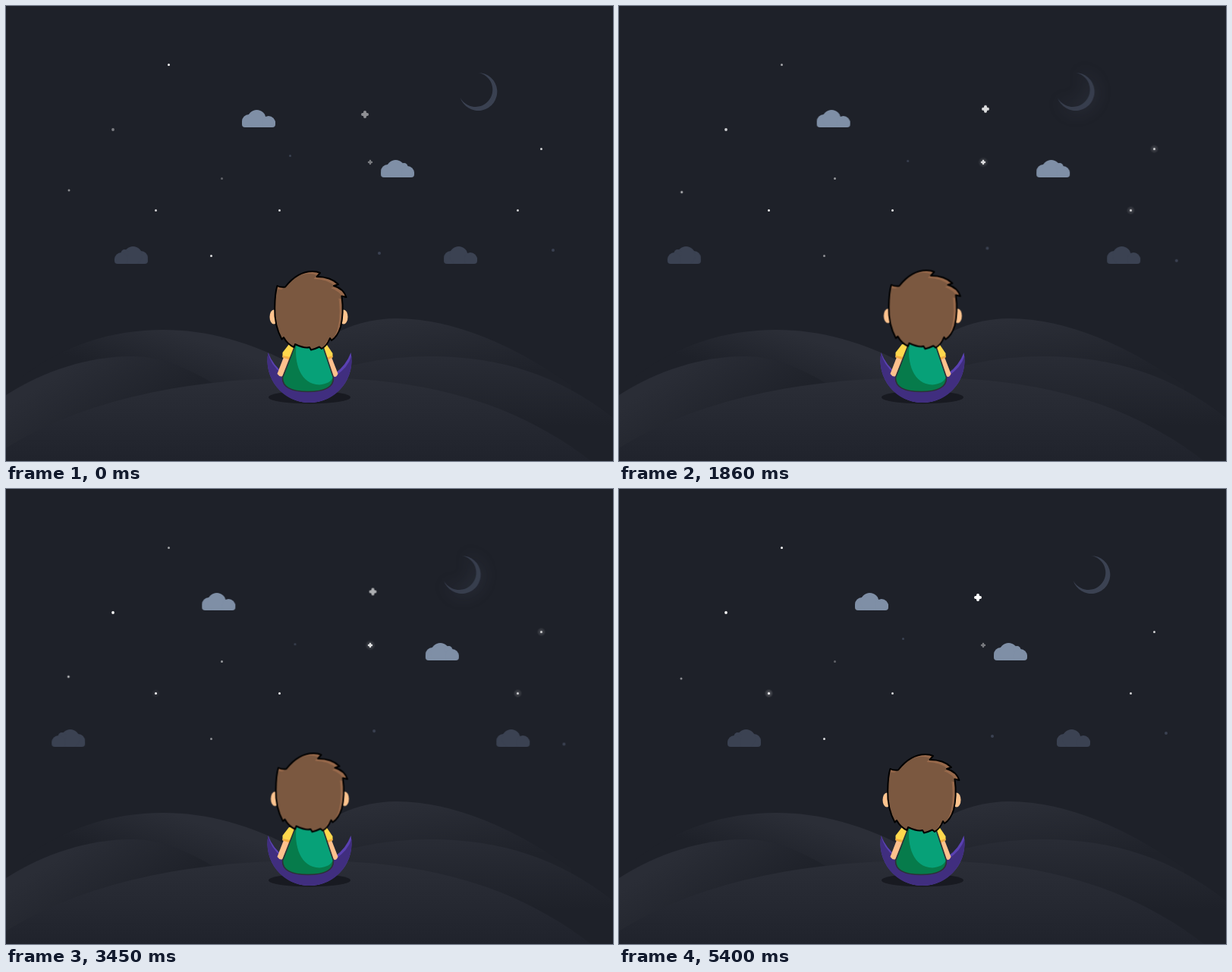
An HTML page for the animation above (5430 ms loop, 800 px wide and 600 px high).

```html
<!DOCTYPE html>
<html lang="en">
<head>
<meta charset="utf-8">
<title>Night sky</title>
<style>
html, body { margin: 0; width: 100%; height: 100%; overflow: hidden; background: #1e2129; }
svg { display: block; width: 800px; height: 600px; }

/* Half the cycle is 2700 ms out, 2700 ms back, then a short hold. */
.drift, .pulse, .rise, .repeat, .late, .slide { animation: 5430ms linear infinite; }
.drift { animation-name: drift; }
.slide { animation-name: slide; }
.pulse { animation-name: pulse; }
.rise { animation-name: rise; }
.repeat { animation-name: repeat; }
.late { animation-name: late; }

@keyframes drift {
  0%, 99.45%, 100% { transform: translate(0, 0); }
  49.72% { transform: translate(var(--x), var(--y, 0px)); }
}
@keyframes slide {
  0% { transform: translate(0, 0); }
  99.45%, 100% { transform: translate(var(--x), var(--y)); }
}
@keyframes pulse {
  0%, 99.45%, 100% { opacity: var(--a); }
  49.72% { opacity: var(--b); }
}
@keyframes rise {
  0% { opacity: var(--a); }
  49.72%, 100% { opacity: var(--b); }
}
@keyframes repeat {
  0% { opacity: .5; }
  49.72% { opacity: 1; }
  49.73% { opacity: .5; }
  99.45%, 100% { opacity: 1; }
}
@keyframes late {
  0%, 49.72% { opacity: 0; }
  99.45%, 100% { opacity: 1; }
}
.star { fill: #fff; }
.dim { fill: #3b4252; }
.pale { fill: #7f8fa6; }
.plus { stroke: #fff; stroke-linecap: round; }
</style>
</head>
<body>
<svg viewBox="0 0 800 600">
  <defs>
    <linearGradient id="hillL" gradientUnits="userSpaceOnUse" x1="215" y1="427" x2="192" y2="497">
      <stop stop-color="#2b2e37"/><stop offset="1" stop-color="#1e2129"/>
    </linearGradient>
    <linearGradient id="hillR" gradientUnits="userSpaceOnUse" x1="525" y1="412" x2="535" y2="500">
      <stop stop-color="#2b2e37"/><stop offset="1" stop-color="#1f222a"/>
    </linearGradient>
    <linearGradient id="midL" gradientUnits="userSpaceOnUse" x1="95" y1="470" x2="150" y2="560">
      <stop stop-color="#2a2d36"/><stop offset="1" stop-color="#1f222a"/>
    </linearGradient>
    <linearGradient id="midR" gradientUnits="userSpaceOnUse" x1="600" y1="462" x2="600" y2="555">
      <stop stop-color="#292c35"/><stop offset="1" stop-color="#1e2129"/>
    </linearGradient>
    <linearGradient id="front" gradientUnits="userSpaceOnUse" x1="400" y1="490" x2="400" y2="600">
      <stop stop-color="#2b2e37"/><stop offset="1" stop-color="#20232c"/>
    </linearGradient>
    <radialGradient id="halo">
      <stop stop-color="#fff" stop-opacity=".34"/>
      <stop offset=".5" stop-color="#fff" stop-opacity=".16"/>
      <stop offset="1" stop-color="#fff" stop-opacity="0"/>
    </radialGradient>
    <filter id="soft" x="-100%" y="-100%" width="300%" height="300%">
      <feGaussianBlur stdDeviation="11"/>
    </filter>
    <clipPath id="cloudClip"><rect width="44" height="23" rx="4"/><rect width="44" height="17"/></clipPath>
    <g id="cloudA" clip-path="url(#cloudClip)">
      <rect y="15" width="44" height="8"/>
      <circle cx="9" cy="15" r="9"/><circle cx="19.5" cy="12" r="12"/><circle cx="35" cy="17" r="9"/>
    </g>
    <g id="cloudB" clip-path="url(#cloudClip)">
      <rect y="16" width="44" height="7"/>
      <circle cx="9" cy="15" r="9"/><circle cx="19.5" cy="12" r="12"/>
      <circle cx="30.5" cy="9" r="5"/><circle cx="35" cy="17" r="9"/>
    </g>
    <path id="moon" d="M622 88A25 25 0 1 1 598.5 120.5A22.6 22.6 0 1 0 622 88Z"/>
    <path id="hair" d="M357.500 369Q362 371.500 368 370.500Q384 350 404 350Q410 350 414 352L409.500 357Q428 357 438 367L432 369Q445 373 448.500 384L442.500 382.500Q445.500 405 441 423Q437 436 429 441L427 438Q423 448 416 452L413 449.500Q408 452 402 453.500L400 450Q394 452 381 446L379.500 450Q371 446 366 437L363.500 439.500Q353.500 421 354.200 398Q354.500 378 357.500 369Z"/>
    <clipPath id="hairClip"><use href="#hair"/></clipPath>
  </defs>

  <rect width="800" height="600" fill="#1e2129"/>

  <!-- sky -->
  <circle class="star pulse" style="--a:1;--b:.42" cx="214.500" cy="77.500" r="1.500"/>
  <circle class="star rise" style="--a:.42;--b:.95" cx="141" cy="163" r="1.900"/>
  <g class="slide" style="--x:-1px;--y:7px">
    <circle class="star pulse" style="--a:.48;--b:.88" cx="83" cy="243" r="1.500"/>
  </g>
  <circle class="star pulse" style="--a:.3;--b:.65" cx="284.500" cy="227.500" r="1.500"/>
  <circle class="star pulse" style="--a:.85;--b:.35" cx="270.500" cy="329.500" r="1.500"/>
  <circle class="star pulse" style="--a:.82;--b:1" cx="360.500" cy="269.500" r="1.500"/>

  <circle class="late" fill="url(#halo)" cx="197.500" cy="269.500" r="6"/>
  <circle class="star rise" style="--a:.8;--b:1" cx="197.500" cy="269.500" r="1.500"/>
  <circle class="pulse" style="--a:0;--b:1" fill="url(#halo)" cx="705.500" cy="188.500" r="6"/>
  <circle class="star pulse" style="--a:.8;--b:.7" cx="705.500" cy="188.500" r="1.500"/>
  <circle class="pulse" style="--a:0;--b:1" fill="url(#halo)" cx="674.500" cy="269.500" r="6"/>
  <circle class="star pulse" style="--a:.8;--b:.7" cx="674.500" cy="269.500" r="1.500"/>

  <circle class="dim drift" style="--x:9px;--y:10px" cx="374.500" cy="197.500" r="1.500"/>
  <circle class="dim drift" style="--x:-9.500px;--y:-9.500px" cx="492" cy="326" r="2"/>
  <circle class="dim drift" style="--x:20px;--y:20px" cx="721" cy="322" r="2"/>

  <g class="drift" style="--x:14.500px;--y:-10.500px">
    <path class="plus repeat" stroke-width="4" d="M470 143h6M473 140v6"/>
  </g>
  <circle class="pulse" style="--a:0;--b:1" fill="url(#halo)" cx="480" cy="206" r="7"/>
  <path class="plus pulse" style="--a:.4;--b:1" stroke-width="2.400" d="M478 206h4M480 204v4"/>

  <g class="drift" style="--x:-30px">
    <g class="pulse" style="--a:0;--b:.5"><use href="#moon" fill="#667088" filter="url(#soft)"/></g>
    <use href="#moon" class="pulse" style="--a:1;--b:.82" fill="#3b4252"/>
  </g>

  <g class="drift" style="--x:-73px"><use href="#cloudA" class="pale" x="311" y="137"/></g>
  <g class="drift" style="--x:81.500px"><use href="#cloudB" class="pale" x="494" y="203"/></g>
  <g class="drift" style="--x:-114.700px"><use href="#cloudB" class="dim" transform="translate(187 317) scale(-1 1)"/></g>
  <g class="drift" style="--x:96px"><use href="#cloudA" class="dim" x="577" y="317"/></g>

  <!-- hills -->
  <path fill="url(#hillL)" d="M20 490C75 447 140 427 207 427C265 427 320 442 385 476L385 500H20Z"/>
  <path fill="url(#hillR)" d="M385 466C430 426 473 412 515 412C590 412 670 448 745 500L745 520H385Z"/>
  <path fill="url(#midL)" d="M0 513C52 480 110 462 165 462C210 462 245 480 290 508V600H0Z"/>
  <path fill="url(#midR)" d="M420 484C470 467 520 462 560 462C650 462 730 487 800 543V600H420Z"/>
  <path fill="url(#front)" d="M0 583C100 520 240 490 400 490C560 490 675 526 771 600H0Z"/>

  <!-- seat -->
  <ellipse cx="400" cy="516" rx="54" ry="8.500" fill="#181a21"/>
  <path fill="#5a41b2" d="M345.500 457A55.500 55.500 0 1 0 454.500 457A58 58 0 0 1 345.500 457Z"/>
  <path fill="#402e7f" d="M345.500 457A55.500 55.500 0 1 0 455.200 462A56 46 0 0 1 345.500 457Z"/>

  <!-- body -->
  <path fill="#ffc18d" d="M366 463L375 465L364.500 488Q361 490 357.500 485Z"/>
  <path fill="#ffc18d" d="M429 463L420 465L431.500 488Q435 491 437.500 485Z"/>
  <path fill="#ffd84d" d="M373 446L382 447L374 466L364.500 463V457Z"/>
  <path fill="#ffd84d" d="M421 444L430.500 458V463L424 466L416 447Z"/>
  <path fill="#f3ae43" d="M364.500 461L375 463L374 466.500L364.500 463.500ZM430.500 461L422.500 463.500L424 466.500L430.500 463.500Z"/>
  <path fill="#067b4b" d="M382 445L364.500 490Q364 508.500 398 508.500Q432 508.500 431.500 490L416.500 445Z"/>
  <path fill="#07a178" d="M383 445C379 470 388 499 413 499.500Q428 498 431 489L416.500 445Z"/>
  <path fill="none" stroke="#2d3136" stroke-width="1.600" d="M382 445L364.500 490Q364 508.500 398 508.500Q432 508.500 431.500 490L416.500 445"/>

  <!-- head -->
  <g class="drift" style="--x:2px;--y:-2px">
    <ellipse cx="353" cy="410" rx="5.500" ry="9.500" fill="#ffc48f"/>
    <ellipse cx="445" cy="410" rx="5.500" ry="9.500" fill="#ffc48f"/>
    <use href="#hair" fill="#98694b"/>
    <g clip-path="url(#hairClip)"><use href="#hair" x="-4" y="3" fill="#7b5840"/></g>
    <use href="#hair" fill="none" stroke="#000" stroke-width="2" stroke-linejoin="round"/>
  </g>
</svg>
</body>
</html>
```
